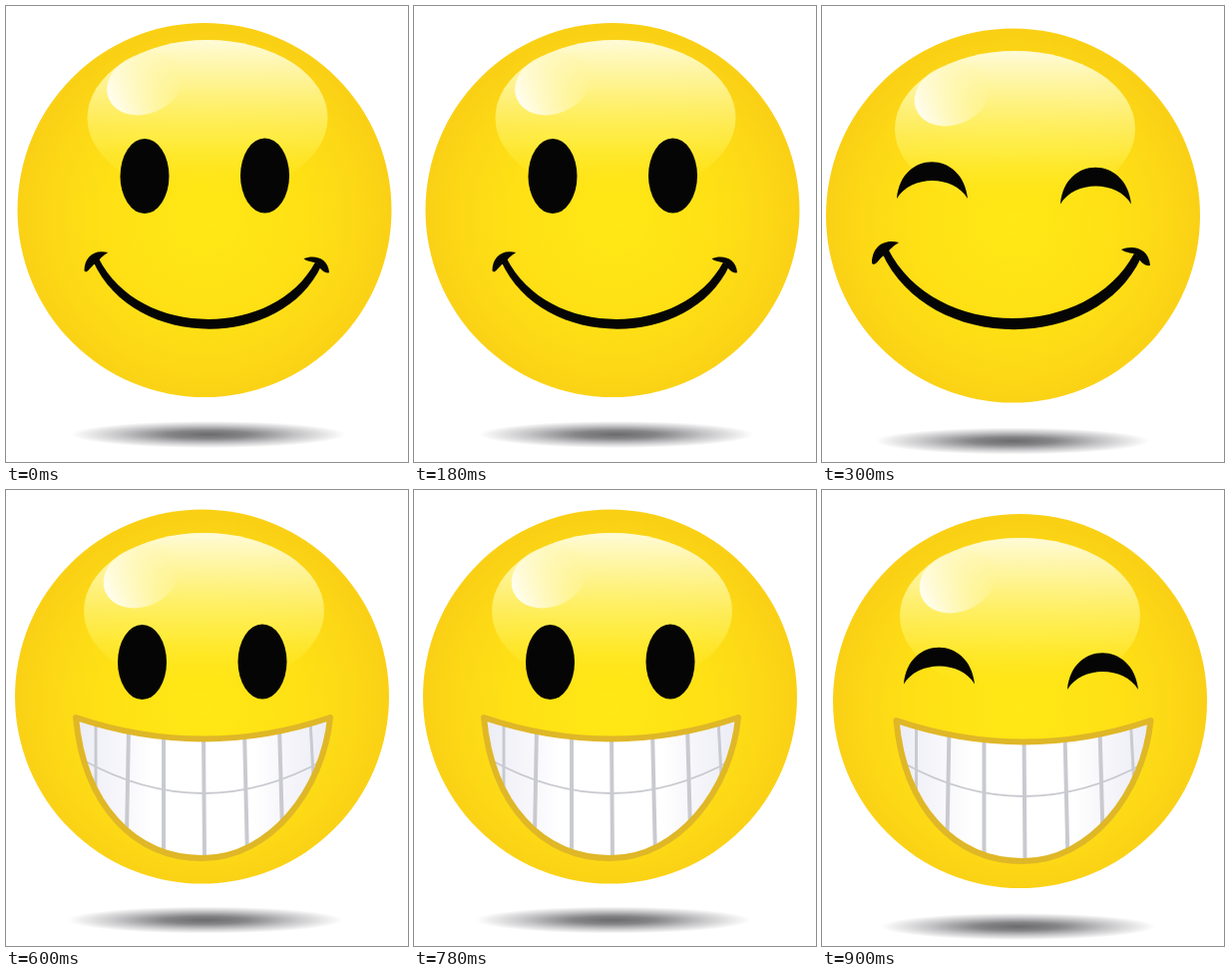
Write an HTML page that moves like this. It is 403 px wide and 457 px high and loops after 1.2 s.

```html
<!DOCTYPE html>
<html lang="en">
<head>
<meta charset="utf-8">
<title>Smiley</title>
<style>
html, body { margin: 0; width: 100%; height: 100%; overflow: hidden; background: #fff; }
svg { display: block; width: 100vw; height: 100vh; }
</style>
</head>
<body>
<svg viewBox="0 0 403 457">
  <defs>
    <radialGradient id="skin" cy=".52">
      <stop offset="0" stop-color="#ffe815"/>
      <stop offset=".55" stop-color="#fee015"/>
      <stop offset=".85" stop-color="#fcd716"/>
      <stop offset="1" stop-color="#fad015"/>
    </radialGradient>
    <linearGradient id="gloss" x2="0" y2="1">
      <stop offset="0" stop-color="#fffde2" stop-opacity=".95"/>
      <stop offset=".3" stop-color="#fff9a8" stop-opacity=".8"/>
      <stop offset=".65" stop-color="#fff25a" stop-opacity=".6"/>
      <stop offset="1" stop-color="#ffe815" stop-opacity="0"/>
    </linearGradient>
    <linearGradient id="spot" x1="0" y1=".55" x2="1" y2=".45">
      <stop offset="0" stop-color="#fff" stop-opacity=".9"/>
      <stop offset=".4" stop-color="#fffce0" stop-opacity=".6"/>
      <stop offset="1" stop-color="#fff59a" stop-opacity=".15"/>
    </linearGradient>
    <radialGradient id="shade">
      <stop offset="0" stop-color="#6b6a6c"/>
      <stop offset=".3" stop-color="#858486"/>
      <stop offset=".65" stop-color="#c6c5c7"/>
      <stop offset="1" stop-color="#fff"/>
    </radialGradient>
    <linearGradient id="enamel">
      <stop offset="0" stop-color="#ececf5"/>
      <stop offset=".2" stop-color="#f8f8fc"/>
      <stop offset=".3" stop-color="#fff"/>
      <stop offset=".7" stop-color="#fff"/>
      <stop offset=".82" stop-color="#f6f6fb"/>
      <stop offset="1" stop-color="#ececf5"/>
    </linearGradient>
    <path id="lips" d="M70 228Q198 271 325 228C318 300 265 369 197 369C128 369 78 315 70 228Z"/>
    <clipPath id="inside"><use href="#lips"/></clipPath>
    <path id="arc" d="M75 193C79 144 141 144 146 193C132 169 89 169 75 193Z"/>
  </defs>

  <ellipse id="shadow" rx="138" ry="13.5" fill="url(#shade)"/>
  <circle id="head" r="187.5" fill="url(#skin)"/>
  <g id="shine">
    <ellipse rx="120.5" cy="78" ry="78" fill="url(#gloss)"/>
    <ellipse cx="-63" cy="44" rx="39" ry="30" transform="rotate(-22 -63 44)" fill="url(#spot)"/>
  </g>

  <g id="open" fill="#050505">
    <ellipse cx="139" cy="170.5" rx="24.5" ry="37.5"/>
    <ellipse cx="259.5" cy="170" rx="24.5" ry="37.5"/>
  </g>
  <g id="happy" fill="#050505">
    <use href="#arc"/>
    <use href="#arc" x="164" y="5.5"/>
  </g>
  <g id="smile" fill="#050505">
    <path d="M66 243C112 335.5 266 335.5 313 248L320 252C275 349 106 349 60 247Z"/>
    <path d="M50 258C50 243 60 233 77 237C71 241 67 244 65 249C59 250 56 258 52 259Z"/>
    <path d="M300 244C312 239 328 243 329 260C324 261 319 257 316 250C312 247 305 248 300 244Z"/>
  </g>
  <g id="grin" fill="none" stroke="#c9cad0">
    <use href="#lips" fill="url(#enamel)" stroke="none"/>
    <g clip-path="url(#inside)">
      <path stroke-width="3" d="M90 230V300M305 230L309 305"/>
      <path stroke-width="4" d="M123 236L121 345M158 240V370M198 240L199 372M239 240L242 370M274 235L277 342"/>
      <path stroke-width="1.8" d="M76 270Q198 338 320 270"/>
    </g>
    <use href="#lips" stroke="#dfb727" stroke-width="6" stroke-linejoin="round"/>
  </g>
</svg>
<script>
// Each part lists its offset; parts left out of a pose are hidden.
const poses = [
  { shadow: [203, 429.5], head: [199, 204.5], shine: [202, 34], open: [0, 0], smile: [34.5, 38.5, .88] },
  { shadow: [191, 436], head: [191.5, 210], shine: [193.5, 45], happy: [0, 0], smile: [0, 0] },
  { shadow: [199.5, 431], head: [196.5, 207], shine: [198.5, 43], open: [-2.5, 2], grin: [0, 0] },
  { shadow: [196.5, 437.5], head: [198.5, 211.5], shine: [198.5, 48], happy: [7, 1.5], grin: [4.5, 3] }
];
const parts = ['shadow', 'head', 'shine', 'open', 'happy', 'smile', 'grin'];
const hold = 300;

function draw() {
  const pose = poses[Math.floor(performance.now() / hold) % poses.length];
  for (const id of parts) {
    const part = document.getElementById(id), at = pose[id];
    part.style.display = at ? '' : 'none';
    if (at) part.setAttribute('transform', `translate(${at[0]} ${at[1]}) scale(${at[2] || 1})`);
  }
  requestAnimationFrame(draw);
}
draw();
</script>
</body>
</html>
```
